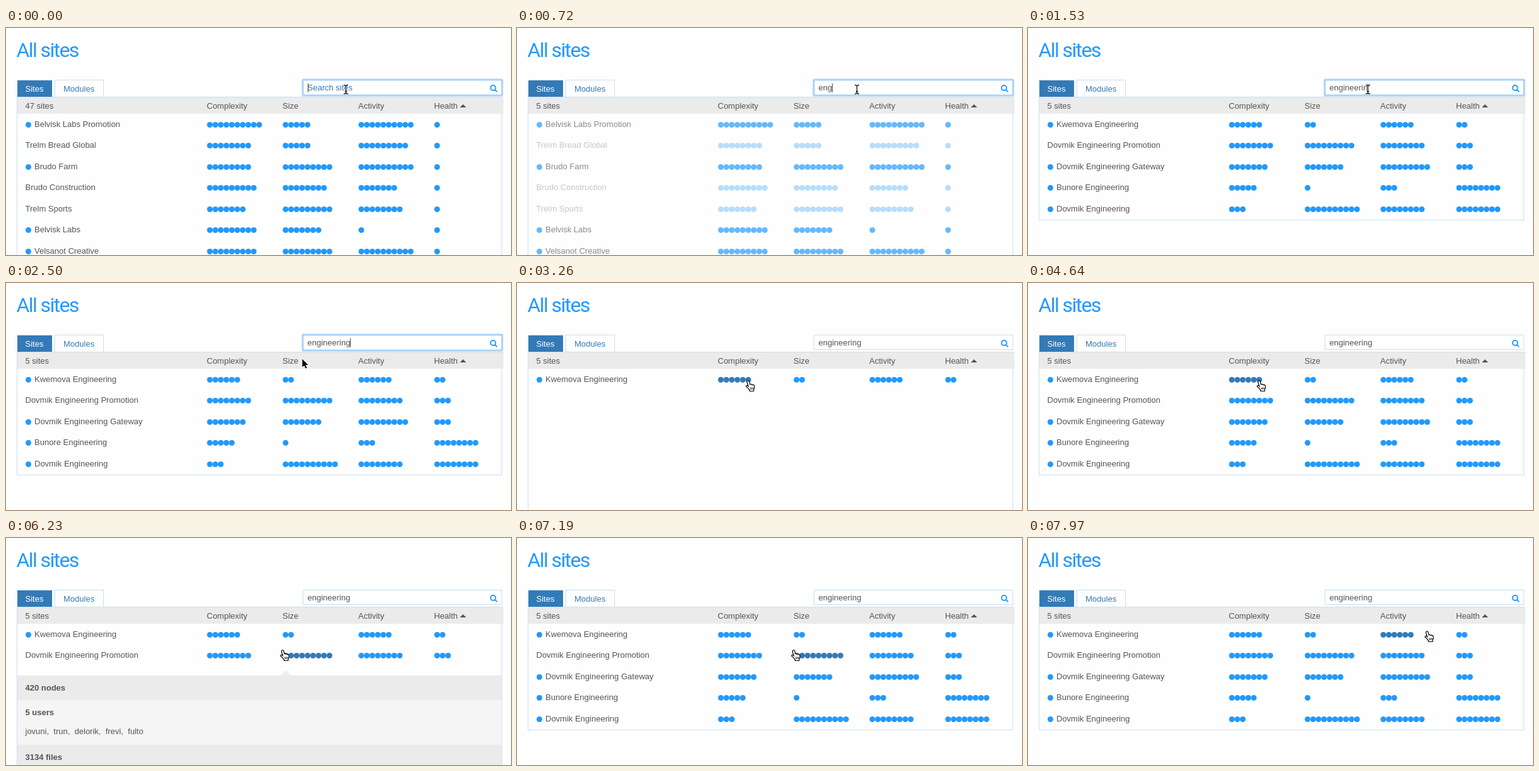
These frames come from a looping animation (800 px wide and 360 px high, 8000 ms). An HTML page with a canvas:

```html
<!DOCTYPE html>
<html lang="en">
<head>
<meta charset="utf-8">
<title>All sites</title>
<style>
  html, body { margin: 0; width: 100%; height: 100%; overflow: hidden; background: #fefefe; }
  canvas { display: block; }
</style>
</head>
<body>
<canvas id="stage" width="800" height="360"></canvas>
<script>
const ctx = document.getElementById('stage').getContext('2d');
const LOOP = 8000;
const SANS = '"Liberation Sans", Arial, sans-serif';
const BLUE = '#2299fd', NAVY = '#337ab7', INK = '#555', LINE = '#cbdfef', PALE = '#ebebeb', PAGE = '#fefefe';
const COLS = [318, 438, 558, 678];
const QUERY = 'engineering';
const KEYS = [360, 480, 600, 780, 900, 1010, 1110, 1230, 1470, 1530, 1830];
const BLUR = 3030;

// name, marked, [complexity, size, activity, health]
const ALL = [
  ['Belvisk Labs Promotion', 1, [10, 5, 10, 1]],
  ['Trelm Bread Global', 0, [8, 5, 9, 1]],
  ['Brudo Farm', 1, [8, 9, 10, 1]],
  ['Brudo Construction', 0, [9, 8, 7, 1]],
  ['Trelm Sports', 0, [7, 9, 8, 1]],
  ['Belvisk Labs', 1, [9, 7, 1, 1]],
  ['Velsanot Creative', 1, [9, 9, 10, 1]]
];
const FOUND = [
  ['Kwemova Engineering', 1, [6, 2, 6, 2]],
  ['Dovmik Engineering Promotion', 0, [8, 9, 8, 3]],
  ['Dovmik Engineering Gateway', 1, [7, 7, 9, 3]],
  ['Bunore Engineering', 1, [5, 1, 3, 8]],
  ['Dovmik Engineering', 1, [3, 10, 8, 8]]
];
// start, end, from, to
const MOVES = [
  [2230, 2850, [538, 97], [366, 154]],
  [5120, 5400, [366, 154], [438, 177]],
  [7620, 7970, [438, 177], [632, 147]]
];

const clamp = v => Math.min(1, Math.max(0, v));
const ramp = (t, a, b) => clamp((t - a) / (b - a));
const swing = p => (1 - Math.cos(Math.PI * p)) / 2;
const rowY = i => Math.floor(153 + 33.5 * i);

function text(s, x, y, color = INK, font = '13px ' + SANS) {
  ctx.font = font;
  ctx.fillStyle = color;
  ctx.fillText(s, x, y);
}

function rect(x, y, w, h, color) {
  ctx.fillStyle = color;
  ctx.fillRect(x, y, w, h);
}

function frame(x, y, w, h, color, width = 1) {
  ctx.strokeStyle = color;
  ctx.lineWidth = width;
  ctx.strokeRect(x, y, w, h);
}

function dots(x, y, n, color) {
  ctx.fillStyle = color;
  for (let i = 0; i < n; i++) {
    ctx.beginPath();
    ctx.arc(x + i * 8.7, y, 4.5, 0, 7);
    ctx.fill();
  }
}

function poly(points, color) {
  ctx.fillStyle = color;
  ctx.beginPath();
  points.forEach(p => ctx.lineTo(...p));
  ctx.fill();
}

function pointer(t) {
  let pos = MOVES[0][2];
  for (const [a, b, from, to] of MOVES) {
    if (t < a) break;
    const p = swing(ramp(t, a, b));
    pos = from.map((v, i) => v + (to[i] - v) * p);
  }
  return pos;
}

function hovered([x, y]) {
  const col = COLS.findIndex(c => x >= c && x < c + 90);
  const row = [0, 1].find(i => Math.abs(y - rowY(i) - 0.5) < 10);
  return col < 0 || row === undefined ? null : { row, col };
}

function drawRow([name, marked, counts], i, hover) {
  const y = rowY(i);
  if (marked) dots(35.5, y + 0.5, 1, BLUE);
  text(name, marked ? 45 : 30.5, y + 4);
  counts.forEach((n, c) => {
    const on = hover && hover.row === i && hover.col === c;
    dots(COLS[c] + 4.9, y + 0.5, n, on ? NAVY : BLUE);
  });
}

function drawHead(t) {
  ctx.letterSpacing = '-1.6px';
  text('All sites', 16.5, 46, BLUE, '32px Roboto, sans-serif');
  ctx.letterSpacing = '0px';

  rect(18, 83, 55, 26, NAVY);
  text('Sites', 30.5, 101, '#fff');
  frame(77.5, 82.5, 77, 27, LINE);
  text('Modules', 91, 101, NAVY);

  rect(17, 109, 771, 27, PALE);
  rect(17, 109, 769, 1, LINE);
  text((t < 660 ? 47 : 5) + ' sites', 30.5, 128);
  ['Complexity', 'Size', 'Activity', 'Health'].forEach((s, i) => text(s, COLS[i], 128));
  poly([[719, 126], [724, 121], [729, 126]], INK);
}

function drawSearch(t) {
  const typed = QUERY.slice(0, KEYS.filter(k => t >= k).length);
  const focus = t < BLUR;
  rect(470, 82, 316, 24, '#fff');
  if (focus) {
    ctx.beginPath();
    ctx.roundRect(469.5, 81.5, 317, 26, 2);
    ctx.strokeStyle = '#cfe5fb';
    ctx.lineWidth = 3;
    ctx.stroke();
    frame(470.5, 82.5, 315, 24, '#92c6f8', 1.6);
  } else {
    frame(470.5, 82.5, 315, 23, LINE);
  }
  text(typed || 'Search sites', 477.5, 99, typed ? INK : NAVY);
  if (focus) rect(Math.round(477.5 + (typed ? ctx.measureText(typed).width : 0)), 88, 1, 14, '#444');

  ctx.strokeStyle = BLUE;
  ctx.lineWidth = 1.9;
  ctx.beginPath();
  ctx.arc(771.6, 95, 4, 0, 7);
  ctx.moveTo(774.6, 98);
  ctx.lineTo(778, 101.4);
  ctx.stroke();
}

function drawTable(t, hover) {
  const openRow = t >= 3260 && t < 4640 ? 0 : t >= 5820 && t < 7190 ? 1 : -1;
  const tall = t < 860 || openRow >= 0;
  rect(17, 109, 1, tall ? 251 : 196, LINE);
  rect(785, 136, 1, tall ? 224 : 169, LINE);
  if (!tall) rect(17, 304, 769, 1, LINE);

  if (t < 860) {
    ALL.forEach((row, i) => {
      ctx.globalAlpha = 1 - (row[1] ? ramp(t, 660, 860) : ramp(t, 660, 750));
      drawRow(row, i);
    });
  } else {
    ctx.globalAlpha = ramp(t, 830, 1080);
    FOUND.forEach((row, i) => {
      if (openRow < 0 || i <= openRow) drawRow(row, i, hover);
    });
  }
  ctx.globalAlpha = 1;
}

function band(y, h, color, title, line) {
  rect(18, y, 767, h, color);
  text(title, 30.5, y + 24, INK, 'bold 13px ' + SANS);
  if (line) text(line, 30.5, y + 54);
}

function arrowUp(x, y) {
  poly([[x - 9, y], [x, y - 8], [x + 9, y]], '#f0f0f0');
}

function drawDetails(t) {
  if (t >= 3320 && t < 4640) {
    arrowUp(323, 185);
    band(185, 39, PALE, '14 content types');
    band(224, 71, '#f5f5f5', '5 views', t >= 3740 ? 'news,  events,  pages,  blocks,  users' : '');
    band(295, 65, PALE, '52 modules');
  }
  if (t >= 5860 && t < 7190) {
    ctx.save();
    ctx.beginPath();
    ctx.rect(17, 210, 769, 8 + 200 * swing(ramp(t, 5860, 6230)));
    ctx.clip();
    arrowUp(443, 218);
    band(218, 39, PALE, '420 nodes');
    band(257, 71, '#f5f5f5', '5 users', 'jovuni,  trun,  delorik,  frevi,  fulto');
    band(328, 39, PALE, '3134 files');
    ctx.restore();
  }
}

const HAND = new Path2D('M3.5 1Q5.5.4 6 2.5L7 6.8Q8.6 5.6 9.4 7.2Q11 6.2 11.8 7.9Q13.6 7.2 14.1 9.2L14.3 12L12.9 15V17.5H6.6V16L3.6 12.4L1 10.2Q.8 8 3 8.6L4.4 9.8L2.4 3Q2.1 1.4 3.5 1Z');
const KNUCKLES = new Path2D('M8 11.5V15M10 11.5V15M12 11.5V14.5');
const ARROW = new Path2D('M.5.5V13.5L3.5 10.8L5.6 15.6L7.8 14.6L5.7 10H9.8Z');
const BEAM = new Path2D('M-3.5-7Q0-7 0-5Q0-7 3.5-7M0-5V5M-3.5 7Q0 7 0 5Q0 7 3.5 7M-1.8 3H1.8');

function drawPointer([x, y], hover) {
  ctx.save();
  ctx.strokeStyle = '#000';
  ctx.fillStyle = '#fff';
  if (y < 107) {
    ctx.translate(x + 0.5, y + 0.5);
    ctx.lineWidth = 3;
    ctx.strokeStyle = 'rgba(255,255,255,.8)';
    ctx.stroke(BEAM);
    ctx.lineWidth = 1.3;
    ctx.strokeStyle = '#111';
    ctx.stroke(BEAM);
  } else if (hover) {
    ctx.translate(x - 4, y);
    ctx.lineWidth = 1.2;
    ctx.fill(HAND);
    ctx.stroke(HAND);
    ctx.lineWidth = 0.9;
    ctx.stroke(KNUCKLES);
  } else {
    ctx.translate(x, y);
    ctx.fillStyle = '#000';
    ctx.strokeStyle = '#fff';
    ctx.lineWidth = 1.6;
    ctx.stroke(ARROW);
    ctx.fill(ARROW);
  }
  ctx.restore();
}

function draw(t) {
  const pos = pointer(t);
  const hover = hovered(pos);
  rect(0, 0, 800, 360, PAGE);
  drawHead(t);
  drawSearch(t);
  drawTable(t, hover);
  drawDetails(t);
  drawPointer(pos, hover);
}

const start = performance.now();
function tick() {
  draw((performance.now() - start) % LOOP);
  requestAnimationFrame(tick);
}
tick();
</script>
</body>
</html>
```
